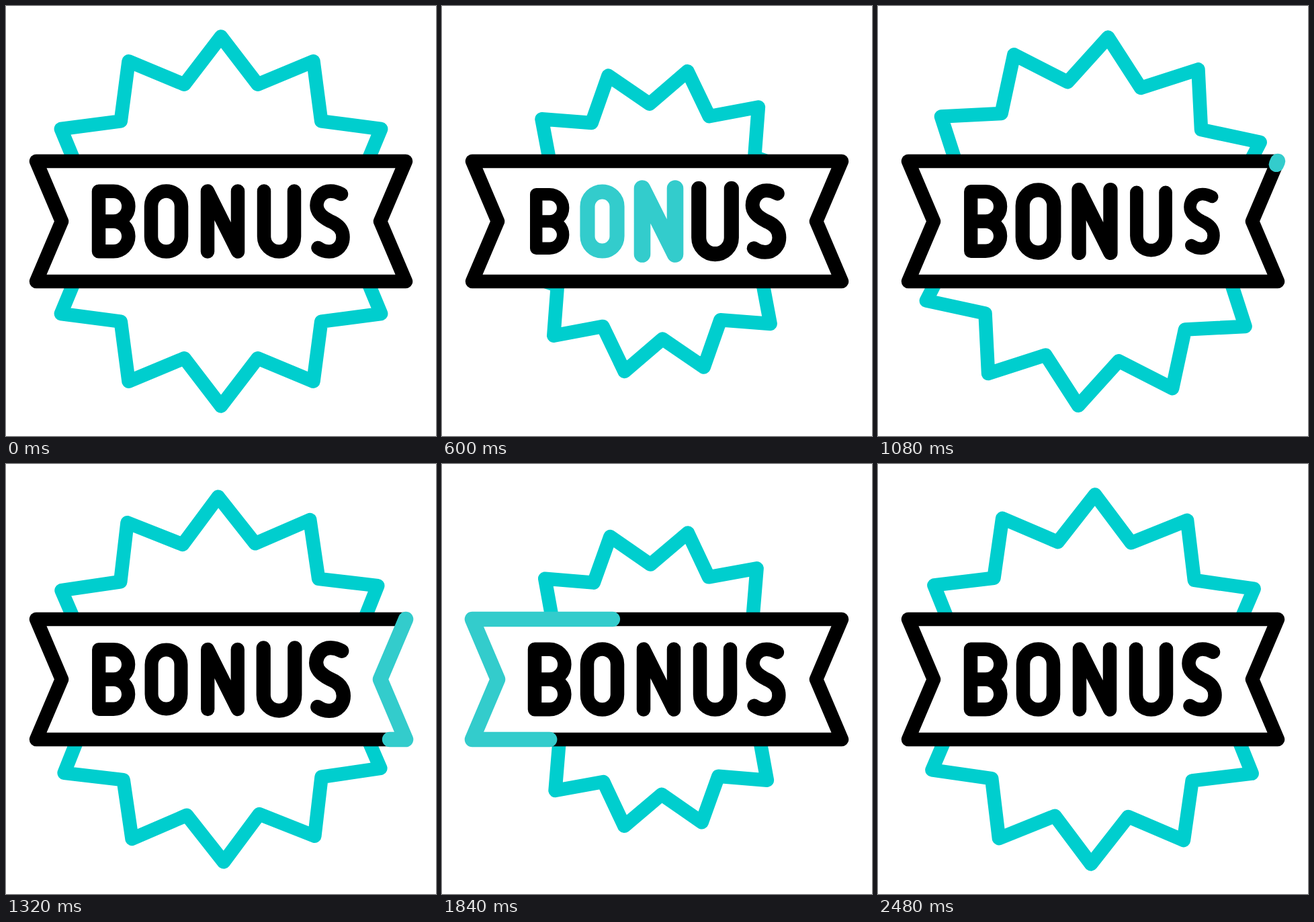
Write an HTML page that moves like this. It is 640 px wide and 640 px high and loops after 2520 ms.

```html
<!DOCTYPE html>
<html lang="en">
<head>
<meta charset="utf-8">
<title>Bonus badge</title>
<style>
  html, body { margin: 0; width: 100%; height: 100%; overflow: hidden; background: #fff; }
  svg { display: block; width: 100vw; height: 100vh; }
  path { fill: none; stroke: #000; stroke-width: 20.5; stroke-linecap: round; stroke-linejoin: round; }
  #star { stroke: #00cece; vector-effect: non-scaling-stroke; }
  #glow, .lit { stroke: #33cccc; stroke-width: 22.6; }
</style>
</head>
<body>
<svg viewBox="0 0 640 640" role="img" aria-label="BONUS">
  <g id="burst"><path id="star"/></g>
  <rect y="231" width="640" height="179" fill="#fff"/>
  <path id="ribbon"/>
  <path id="glow"/>
  <g id="word">
    <path d="M138 320.5H160A22.3 22.3 0 0 0 160 275.8H138V365.2H160A22.3 22.3 0 0 0 160 320.5"/>
    <path d="M216 298A22.5 22.5 0 0 1 261 298V343A22.5 22.5 0 0 1 216 343Z"/>
    <path d="M300 365.5V275.5L345 365.5V275.5"/>
    <path d="M384 275.5V343A22.5 22.5 0 0 0 429 343V275.5"/>
    <path d="M499 280Q491 275.5 483 275.5C471.5 275.5 462.5 285 462.5 297C462.5 308 472 315 482 320C494 325 501.5 332 501.5 344C501.5 356 493 365.5 481 365.5Q472 365.5 464.5 360"/>
  </g>
</svg>
<script>
const LOOP = 2520, HALF = LOOP / 2, STEP = 40, LAG = 120, BEAT = 280;
const $ = id => document.getElementById(id);

// Smooth curve through [time, value] keys: rests at each turn, never overshoots
function curve(keys) {
  const slope = i => (keys[i + 1][1] - keys[i][1]) / (keys[i + 1][0] - keys[i][0]);
  const tan = keys.map((k, i) => {
    if (!i || i === keys.length - 1) return 0;
    const a = slope(i - 1), b = slope(i);
    return a * b > 0 ? 2 * a * b / (a + b) : 0;
  });
  return t => {
    if (t <= keys[0][0]) return keys[0][1];
    const i = keys.findIndex(k => k[0] > t) - 1;
    if (i < 0) return keys[keys.length - 1][1];
    const [t0, v0] = keys[i], [t1, v1] = keys[i + 1];
    const w = t1 - t0, u = (t - t0) / w, s = u * u * (3 - 2 * u);
    return v0 + (v1 - v0) * s + w * u * (1 - u) * ((1 - u) * tan[i] - u * tan[i + 1]);
  };
}

const size = curve([[0, 1], [460, 0.75], [830, 1]]);
const swing = curve([[0, 0], [300, -10.6], [740, -19.5], [980, -10], [1085, 4.7], [HALF, 0]]);
const bounce = curve([0, 0.1, -0.1, 0.05, -0.025, 0].map((a, i) => [40 + i * BEAT, 1 + a]));
const head = curve([[1040, 0], [2200, 1]]);
const tail = curve([[1320, 0], [2480, 1]]);

const outline = pts => "M" + pts.map(p => p.join(" ")).join("L") + "Z";

$("star").setAttribute("d", outline(Array.from({ length: 24 }, (_, i) => {
  const r = i % 2 ? 211 : 275, a = i * Math.PI / 12;
  return [320 + r * Math.sin(a), 320.5 - r * Math.cos(a)];
})));

const band = outline([[595, 231], [557, 320.5], [595, 410], [45, 410], [83, 320.5], [45, 231]]);
$("ribbon").setAttribute("d", band);
$("glow").setAttribute("d", band);
const length = $("glow").getTotalLength();

const letters = [...$("word").children].map(el => {
  const box = el.getBBox();
  return { el, x: box.x + box.width / 2 };
});

const place = (el, x, y, s, turn = 0) =>
  el.setAttribute("transform", `translate(${x} ${y}) rotate(${turn}) scale(${s}) translate(${-x} ${-y})`);

function draw(t) {
  const p = t % HALF;
  place($("burst"), 317.5, 324, size(p), swing(p));

  letters.forEach(({ el, x }, i) => {
    const q = t - i * LAG;
    place(el, x, 320.5, bounce(q));
    el.classList.toggle("lit", q > 40 + BEAT && q < 40 + 2 * BEAT);
  });

  const from = length * tail(t), run = length * head(t) - from;
  const glow = $("glow").style;
  glow.display = run > 0.1 ? "" : "none";
  glow.strokeDasharray = `${run} ${length * 2}`;
  glow.strokeDashoffset = -from;
}

const start = performance.now();
function tick() {
  const t = (performance.now() - start) % LOOP;
  draw(Math.floor(t / STEP) * STEP);
  requestAnimationFrame(tick);
}
tick();
</script>
</body>
</html>
```
